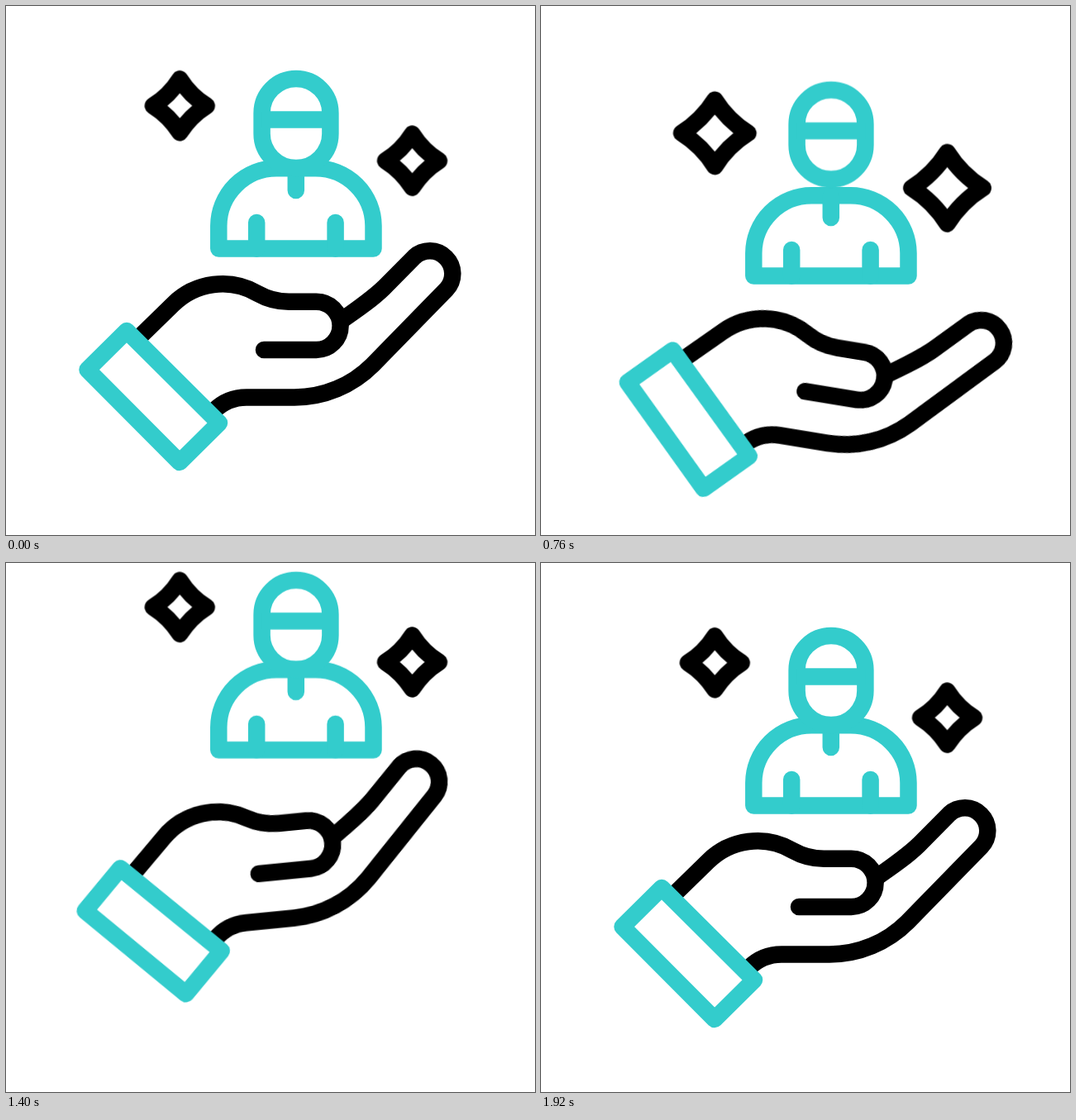
Recreate the animation shown at these times as an HTML page without scripts. Size 640 by 640 pixels, loop 2.04 s.

```html
<!DOCTYPE html>
<html lang="en">
<head>
<meta charset="utf-8">
<title>Helping hand</title>
<style>
  html, body { margin: 0; width: 100%; height: 100%; overflow: hidden; background: #fff; }
  svg { display: block; width: 100%; height: 100%; }
  path, rect { fill: none; stroke-width: 20.5; stroke-linecap: round; stroke-linejoin: round; }
  .teal { stroke: #3cc; }
  .ink { stroke: #000; }
  .butt { stroke-linecap: butt; }

  .hand, .group, .head, .star { animation: 2040ms ease-in-out infinite; }
  .hand { animation-name: tilt; transform-origin: 178.4px 472.4px; }
  .group { animation-name: float; }
  .head { animation-name: nod; }
  .star { vector-effect: non-scaling-stroke; }
  .left { animation-name: glow-left; }
  .right { animation-name: glow-right; }

  @keyframes tilt {
    0%, 1% { transform: translateY(0) rotate(0deg); }
    31.6% { transform: translateY(31px) rotate(10.2deg); animation-timing-function: cubic-bezier(.5, 0, .5, 1); }
    62.5% { transform: translateY(-29px) rotate(-6deg); animation-timing-function: cubic-bezier(.5, 0, .5, 1); }
    94.1%, 100% { transform: translateY(0) rotate(0deg); }
  }
  @keyframes float {
    0%, 1% { transform: translateY(0); animation-timing-function: cubic-bezier(.33, 0, .67, 1); }
    31.6% { transform: translateY(39px); animation-timing-function: cubic-bezier(.5, 0, .5, 1); }
    62.5% { transform: translateY(-71.7px); animation-timing-function: cubic-bezier(.5, 0, .5, 1); }
    94.1%, 100% { transform: translateY(0); }
  }
  @keyframes nod {
    0%, 57.5%, 100% { transform: translateY(0); }
    34.3%, 41.7% { transform: translateY(-19.5px); }
  }
  @keyframes glow-left {
    0%, 18.6%, 62.7%, 100% { transform: scale(1); }
    47% { transform: scale(1.32); }
  }
  @keyframes glow-right {
    0%, 52%, 100% { transform: scale(1); }
    27.5% { transform: scale(1.5); }
  }
</style>
</head>
<body>
<svg viewBox="0 0 640 640">
  <g class="hand">
    <path class="ink" d="M160 402 L202 361 A85 85 0 0 1 304.5 347.8 A77 77 0 0 0 343 357.7 H375.5 A29.1 29.1 0 0 1 375.5 415.9 H312"/>
    <path class="ink butt" d="M405 381 C428 365 443 354.5 457 341 L494 303.6 A27.6 27.6 0 0 1 533 342.6 L443.4 434.4 A133.5 133.5 0 0 1 349 473.5 H291 A56 56 0 0 0 251.4 489.9"/>
    <path class="teal" d="M146 393 L98.5 440 L210 552 L258 504.5 Z"/>
  </g>

  <g class="group">
    <g class="teal">
      <path d="M257.3 293.5 V266 A70 70 0 0 1 327.3 196.3 H374.5 A70 70 0 0 1 444.5 266 V293.5 Z"/>
      <path d="M350.8 196.3 V223 M303.2 293.5 V262 M398.6 293.5 V262"/>
      <g class="head">
        <rect x="309.6" y="88" width="82.8" height="108" rx="41.4"/>
        <path class="butt" d="M309.6 137.5 H392.4"/>
      </g>
    </g>
    <g class="ink">
      <g transform="translate(210.3 120.7)">
        <path class="star left" d="M0 -32.4 Q12.5 -12.5 32.4 0 Q12.5 12.5 0 32.4 Q-12.5 12.5 -32.4 0 Q-12.5 -12.5 0 -32.4 Z"/>
      </g>
      <g transform="translate(491.5 187.2)">
        <path class="star right" d="M0 -32.4 Q12.5 -12.5 32.4 0 Q12.5 12.5 0 32.4 Q-12.5 12.5 -32.4 0 Q-12.5 -12.5 0 -32.4 Z"/>
      </g>
    </g>
  </g>
</svg>
</body>
</html>
```
